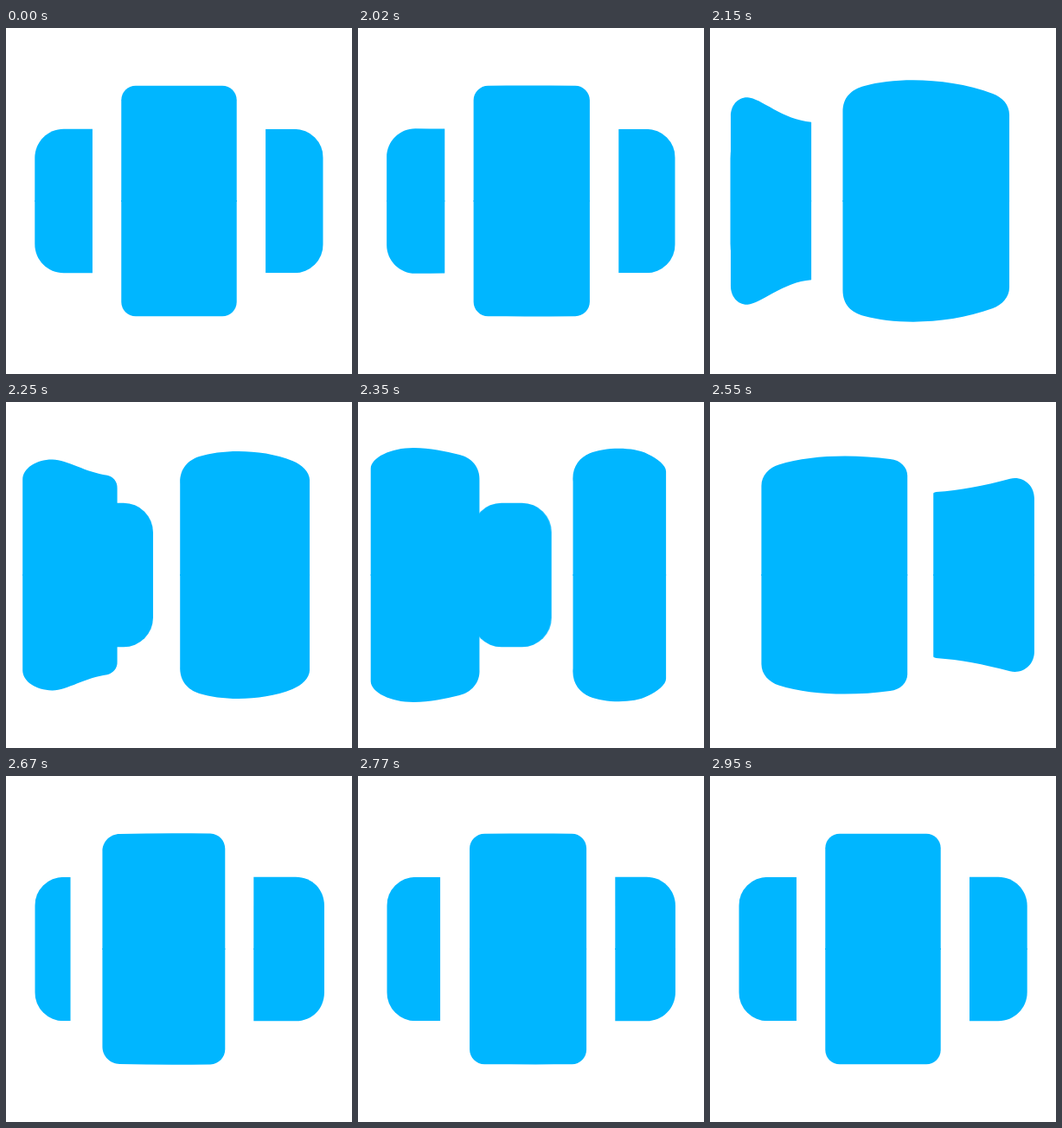
An HTML page without scripts that plays this animation: 400 by 400 pixels, repeating every 3.02 s.

```html
<!DOCTYPE html>
<html lang="en">
<head>
<meta charset="utf-8">
<title>Carousel</title>
<style>
html, body { margin: 0; width: 100%; height: 100%; overflow: hidden; background: #fff; }
svg { display: block; width: 100%; height: 100%; fill: #00b6ff; }
svg * { animation: 3020ms linear infinite; }

/* Cards are drawn as upper halves and mirrored below the middle line */
.front { animation-name: front; }
.side { animation-name: side; }
.exit { animation-name: exit; }
.enter { animation-name: enter; }
.behind { animation-name: behind; }

/* middle card swings to the right */
@keyframes front {
  0%, 66.225% {
    d: path("M133.3 201V83.3C133.3 74.1 140.8 66.7 150 66.7C183 66.7 217 66.7 250 66.7C259.2 66.7 266.7 74.1 266.7 83.3V201Z");
    animation-timing-function: cubic-bezier(.55, 0, .9, .7);
  }
  71.192% { d: path("M153 201V97C153 80 163 71 178 67C215 57 275 57 327 76C338 80 346 89 346 100V201Z"); }
  77.815% { d: path("M248.5 201V92C247 75 256 64 268 59C285 52 318 51 335 60C346 65 356 73 356 80V201Z"); }
  84.437% { d: path("M258 201V106C258 105 259 104.5 261 104C290 102 315 97 347 88.5C362 85 375 96 375 111V201Z"); }
  88.411% {
    d: path("M286 201V116.7C286 116.7 286 116.7 286 116.7C302 116.7 318 116.7 335 116.7C354 116.7 368 131 368 150V201Z");
    animation-timing-function: cubic-bezier(.1, .6, .3, 1);
  }
  97.682%, 100% { d: path("M300 201V116.7C300 116.7 300 116.7 300 116.7C311 116.7 322 116.7 333.3 116.7C351.7 116.7 366.7 131.6 366.7 150V201Z"); }
}

/* left card swings to the middle */
@keyframes side {
  0%, 66.225% {
    d: path("M33.3 201V150C33.3 131.6 48.3 116.7 66.7 116.7C78 116.7 89 116.7 100 116.7C100 116.7 100 116.7 100 116.7V201Z");
    animation-timing-function: cubic-bezier(.55, 0, .9, .7);
  }
  71.192% { d: path("M24 201V102C24 90 32 80 43.5 80.5C58 81 85 107 117 109C117 109 117 109 117 109V201Z"); }
  77.815% { d: path("M14.5 201V77C15 64 38 53 64 53C83 53 100 57 117 61C130 64 141 75 140 91V201Z"); }
  84.437% { d: path("M59 201V97C59 85 68 76 79 72.5C115 61 165 60 208 66C220 67 228 76 228 85V201Z"); }
  88.411% {
    d: path("M111 201V87C111 76 120 67 131 67C165 66 200 66 236 66.5C246 67 253 75 253 84V201Z");
    animation-timing-function: cubic-bezier(.1, .6, .3, 1);
  }
  97.682%, 100% { d: path("M133.3 201V83.3C133.3 74.1 140.8 66.7 150 66.7C183 66.7 217 66.7 250 66.7C259.2 66.7 266.7 74.1 266.7 83.3V201Z"); }
}

/* right card is covered, passes behind, and is uncovered on the left */
@keyframes exit {
  0%, 66.225% {
    clip-path: inset(0 0 0 66.7px);
    animation-timing-function: cubic-bezier(.55, 0, .9, .7);
  }
  71.192%, 100% { clip-path: inset(0 0 0 146px); }
}
@keyframes behind {
  0%, 71.192% { transform: translateX(23px); }
  77.815% { transform: translateX(132px); }
  84.437%, 100% { transform: translateX(73px); }
  0%, 71.19%, 84.44%, 100% { opacity: 0; }
  71.2%, 84.43% { opacity: 1; }
}
@keyframes enter {
  0%, 84.437% { clip-path: inset(0 142.7px 0 0); }
  88.411% {
    clip-path: inset(0 92.7px 0 0);
    animation-timing-function: cubic-bezier(.1, .6, .3, 1);
  }
  97.682%, 100% { clip-path: inset(0 66.7px 0 0); }
}
</style>
</head>
<body>
<svg viewBox="0 0 400 400">
  <rect class="exit" x="233.4" y="116.7" width="133.3" height="166.6" rx="33.3"/>
  <rect class="enter" x="33.3" y="116.7" width="133.4" height="166.6" rx="33.3"/>
  <rect class="behind" y="116.7" width="92" height="166.6" rx="34"/>
  <g>
    <path class="side"/>
    <path class="front"/>
  </g>
  <g transform="matrix(1 0 0 -1 0 400)">
    <path class="side"/>
    <path class="front"/>
  </g>
</svg>
</body>
</html>
```
